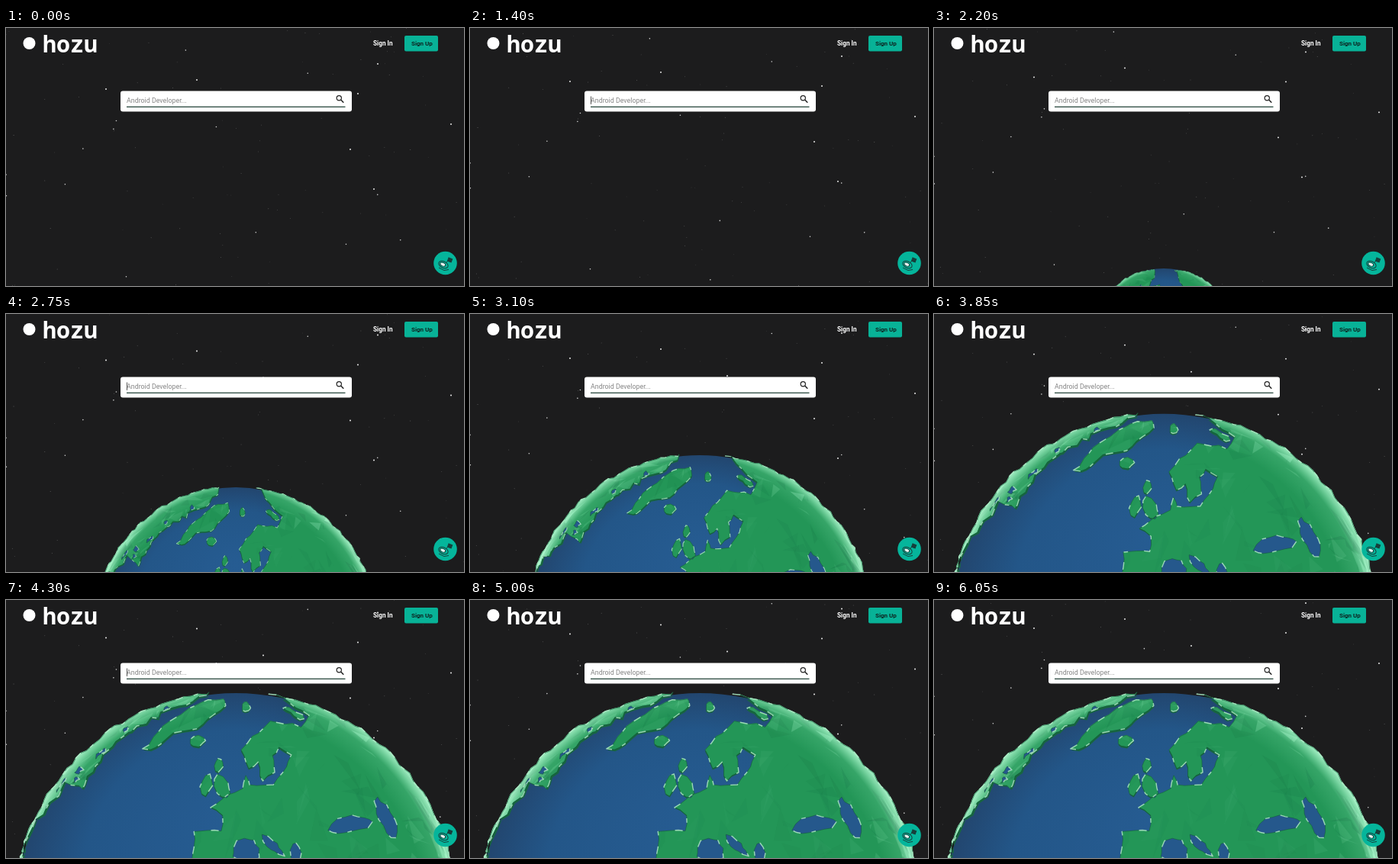
Recreate the animation shown at these times as an HTML page with a canvas. Size 600 px wide and 338 px high, loop 6.1 s.

```html
<!DOCTYPE html>
<html lang="en">
<head>
<meta charset="utf-8">
<title>Search</title>
<style>
html, body { margin: 0; width: 100%; height: 100%; overflow: hidden; background: #1c1c1d; }
canvas, svg { position: absolute; left: 0; top: 0; width: 600px; height: 338px; }
text { font-family: Roboto, "Open Sans", sans-serif; }
.brand { font: 700 30px "Noto Sans Mono", "DejaVu Sans Mono", monospace; fill: #fff; }
.link { font-weight: 600; }
</style>
</head>
<body>
<canvas id="stage" width="600" height="338"></canvas>
<svg viewBox="0 0 600 338">
  <circle cx="30.5" cy="20" r="8" fill="#fff"/>
  <text class="brand" x="48" y="32">hozu</text>
  <text class="link" x="481" y="23.2" font-size="8.2" fill="#fff">Sign In</text>
  <rect x="522" y="10" width="44" height="20.5" rx="2" fill="#08b297"/>
  <text class="link" x="531" y="23.2" font-size="8" fill="#0d2421">Sign Up</text>
  <rect x="150" y="82.5" width="303" height="27" rx="3" fill="#fff"/>
  <text x="158" y="98" font-size="8.85" fill="#858585">Android Developer...</text>
  <path d="M158 103.4H444.5" stroke="#24443a" stroke-width="1.3"/>
  <path id="caret" d="M158.5 89.5V100" stroke="#333" stroke-width=".8"/>
  <g fill="none" stroke="#222" stroke-width="1.2">
    <circle cx="436.3" cy="91.7" r="3.1"/>
    <path d="M438.6 94L442.3 97.8" stroke-width="1.5"/>
  </g>
  <circle cx="575.5" cy="308" r="15.3" fill="#05b59b"/>
  <g stroke="#173f3b" fill="none">
    <ellipse cx="573" cy="310" rx="6.5" ry="4.2" transform="rotate(25 573 310)"/>
    <ellipse cx="572.5" cy="309.5" rx="3.6" ry="2.2" fill="#e6fff8" transform="rotate(25 572 309)"/>
    <path d="M567 314l7 3.5 6-1M577 307l2-2"/>
    <rect x="579" y="301.5" width="5" height="4.5" fill="#173f3b" transform="rotate(20 581 304)"/>
  </g>
</svg>
<script>
const LOOP = 6100, CX = 301, CY = 411, R = 289;
const ctx = document.getElementById('stage').getContext('2d');
const caret = document.getElementById('caret');

let seed = 11;
const rnd = () => (seed = (seed * 16807) % 2147483647) / 2147483647;
const span = (a, b) => a + (b - a) * rnd();

// A few bright stars over a seeded drifting field
const stars = [[131, 80], [250, 68], [487, 47], [461, 86], [451, 159], [482, 211], [337, 103], [583, 126]]
  .map(([x, y]) => ({ x, y, speed: 7.1, size: 1.9, alpha: .95 }));
for (let i = 0; i < 125; i++) {
  const near = i % 8 === 0;
  stars.push({
    x: span(0, 600), y: span(0, 430), speed: i % 3 ? 7.1 : 10.9,
    size: near ? 1.6 : .9, alpha: near ? .8 : span(.15, .45)
  });
}

// Screen point of the resting globe -> unit sphere; points past the limb fold to the back
function lift(px, py) {
  let x = (px - CX) / R, y = (py - CY) / R;
  const d = Math.hypot(x, y);
  const k = d > 1 ? (2 - d) / d : 1;
  x *= k; y *= k;
  return [x, y, Math.sqrt(Math.max(0, 1 - x * x - y * y)) * (d > 1 ? -1 : 1), span(-.006, .009)];
}
// Closed coast through key points, broken into short rough edges
function coast(p, rough = 2) {
  const out = [];
  for (let i = 0; i < p.length; i += 2) {
    const j = (i + 2) % p.length;
    const dx = p[j] - p[i], dy = p[j + 1] - p[i + 1];
    const n = Math.ceil(Math.hypot(dx, dy) / 11);
    for (let k = 0; k < n; k++) {
      const w = k ? rough : 0;
      out.push(lift(p[i] + dx * k / n + span(-w, w), p[i + 1] + dy * k / n + span(-w, w)));
    }
  }
  return out;
}
// Rough ellipse for islands and inland water
function blob(x, y, a, b, tilt = 0) {
  const p = [], c = Math.cos(tilt), s = Math.sin(tilt);
  for (let i = 0; i < 9; i++) {
    const w = i / 9 * 2 * Math.PI, k = span(.85, 1.2);
    const u = Math.cos(w) * a * k, v = Math.sin(w) * b * k;
    p.push(x + u * c - v * s, y + u * s + v * c);
  }
  return coast(p, .8);
}

const lands = [
  // America, Greenland, Eurasia
  coast([16,345, 40,288, 80,241, 103,250, 120,220, 145,187, 165,174, 215,146, 264,125,
    262,114, 170,130, 85,200, 20,290], 3.5),
  coast([180,197, 206,167, 256,135, 285,130, 288,142, 251,170, 219,175, 197,196]),
  coast([345,118, 396,154, 386,168, 346,160, 308,197, 318,221, 330,214, 336,239, 352,226, 349,204,
    357,195, 373,205, 362,227, 350,243, 319,243, 314,231, 310,248, 282,264, 268,272, 284,284,
    282,303, 247,305, 244,360, 610,360, 602,290, 525,178, 425,116], 1.7),
  blob(279, 218, 5, 9, .2),
  blob(282, 246, 9, 16, -.4),
  blob(263, 243, 7, 13, .2),
  blob(251, 186, 10, 7),
  blob(315, 142, 6, 5, .6),
  blob(376, 149, 15, 4, .5)
];
const seas = [
  blob(448, 295, 26, 10, -.12),
  blob(498, 288, 29, 9, 1.05),
  blob(314, 328, 18, 15, .5),
  blob(348, 321, 20, 5, .75),
  blob(379, 332, 7, 13)
];
for (let i = 0; i < 16; i++) {
  const w = span(.25, 1.42), d = R * span(.93, .98);
  seas.push(blob(CX - Math.sin(w) * d, CY - Math.cos(w) * d, span(4, 11), span(1.5, 3), -w));
}

// Low-poly facets on the land
const facets = [];
for (let i = 0; i < 380; i++) {
  const x = Math.sin(span(-1.5, 1.5)), a = span(.15, 2.2);
  const tri = [0, 1, 2].map(() => {
    const u = Math.max(-.999, Math.min(.999, x + span(-.08, .08)));
    const b = a + span(-.14, .14), c = Math.sqrt(1 - u * u);
    return [u, -Math.sin(b) * c, Math.cos(b) * c];
  });
  facets.push({ tri, tone: rnd() });
}

let size = 0, cosT = 1, sinT = 0;
const turn = ([x, y, z, bump = 0]) => [x, y * cosT + z * sinT, z * cosT - y * sinT, bump];

function trace(points, h) {
  const turned = points.map(turn);
  if (turned.every(p => p[2] < 0)) return;
  turned.forEach(([x, y, z, bump], i) => {
    const k = size * (h + bump) / (z < 0 ? Math.hypot(x, y) : 1);
    ctx[i ? 'lineTo' : 'moveTo'](CX + x * k, CY + y * k);
  });
  ctx.closePath();
}
function outline(list, h) {
  ctx.beginPath();
  list.forEach(p => trace(p, h));
}

function drawFacets() {
  for (const { tri, tone } of facets) {
    const t = tri.map(turn);
    if (t.some(p => p[2] < 0)) continue;
    const [x, , z] = t[0];
    const rim = (1 - z) ** 2 * (.3 + .7 * Math.abs(x));
    ctx.fillStyle = tone > .5
      ? `rgba(165,245,200,${(.02 + rim * .7) * tone})`
      : `rgba(16,100,62,${.05 + rim * .5})`;
    ctx.beginPath();
    t.forEach((p, i) => ctx[i ? 'lineTo' : 'moveTo'](CX + p[0] * size * 1.01, CY + p[1] * size * 1.01));
    ctx.fill();
  }
}

function rimLight(side) {
  const x = CX - side * size * .07, y = CY + size * .03;
  const g = ctx.createRadialGradient(x, y, size * .94, x, y, size * 1.08);
  g.addColorStop(0, 'rgba(160,250,200,0)');
  g.addColorStop(.6, 'rgba(160,250,200,.15)');
  g.addColorStop(1, 'rgba(185,255,215,.8)');
  ctx.fillStyle = g;
  ctx.fillRect(side > 0 ? CX : 0, 0, CX, 338);
}

function glint(list, h) {
  outline(list, h);
  ctx.lineWidth = .8;
  ctx.strokeStyle = 'rgba(20,90,58,.7)';
  ctx.stroke();
  ctx.setLineDash([.035, .075, .02, .05].map(v => v * size));
  ctx.lineWidth = size * .005;
  ctx.strokeStyle = 'rgba(195,250,215,.75)';
  ctx.stroke();
  ctx.setLineDash([]);
}

function drawGlobe(t) {
  const u = Math.max(0, Math.min(1, (t - 1730) / 2570));
  const left = (1 - u) * (1 - u);
  size = R * (1 - left);
  if (size < 60) return;
  const tilt = 38 * left * Math.PI / 180;
  cosT = Math.cos(tilt); sinT = Math.sin(tilt);

  const sea = ctx.createRadialGradient(CX, CY - size * .45, 0, CX, CY, size);
  sea.addColorStop(0, '#265c92');
  sea.addColorStop(.7, '#235688');
  sea.addColorStop(1, '#22466f');
  ctx.fillStyle = sea;
  ctx.beginPath();
  ctx.arc(CX, CY, size, 0, 7);
  ctx.fill();

  ctx.lineJoin = 'round';
  outline(lands, .997);
  ctx.fillStyle = '#176640';
  ctx.fill();
  outline(lands, 1.008);
  ctx.fillStyle = '#239657';
  ctx.fill();

  ctx.save();
  ctx.clip();
  drawFacets();
  rimLight(1);
  rimLight(-1);
  outline(seas, 1.003);
  ctx.fillStyle = '#25588c';
  ctx.fill();
  glint(seas, 1.003);
  ctx.restore();
  glint(lands, 1.006);
}

function draw(t) {
  ctx.fillStyle = '#1c1c1d';
  ctx.fillRect(0, 0, 600, 338);
  for (const s of stars) {
    ctx.fillStyle = `rgba(255,255,255,${s.alpha})`;
    ctx.beginPath();
    ctx.arc(s.x, s.y - s.speed * t / 1000, s.size / 2, 0, 7);
    ctx.fill();
  }
  drawGlobe(t);
  const blink = t % 1000;
  caret.style.opacity = blink >= 280 && blink < 800 ? 1 : 0;
}

const start = performance.now();
function tick() {
  const t = (performance.now() - start) % LOOP;
  draw(Math.floor(t / 50) * 50);
  requestAnimationFrame(tick);
}
tick();
</script>
</body>
</html>
```
